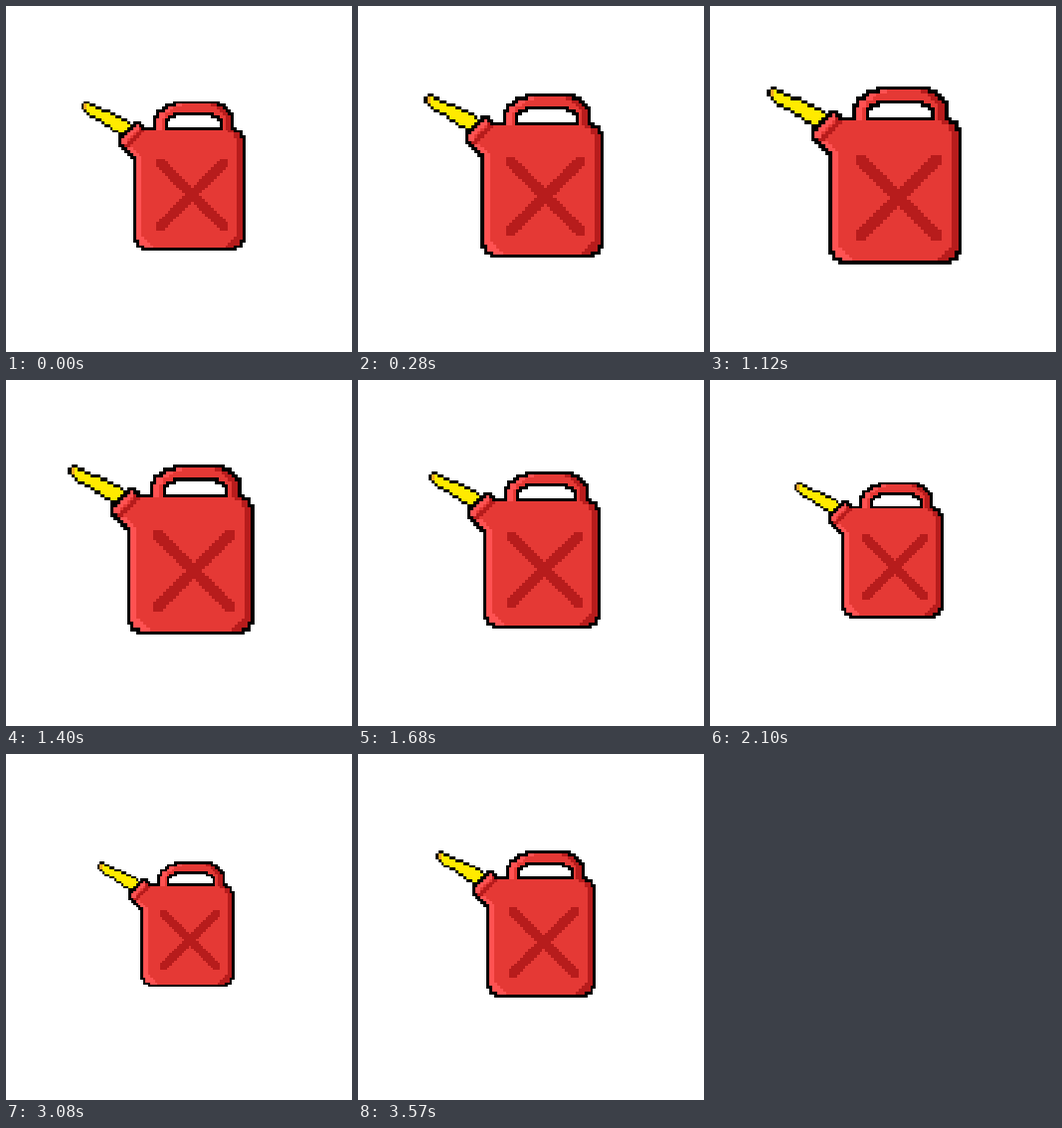
An HTML page for the animation above (3640 ms loop, 348x348 px).

```html
<!DOCTYPE html>
<html lang="en">
<head>
<meta charset="utf-8">
<title>Fuel can</title>
<style>
html, body { margin: 0; width: 100%; height: 100%; overflow: hidden; background: #fff; }
svg { display: block; width: 100%; height: 100%; }
</style>
</head>
<body>
<svg viewBox="0 0 348 348" shape-rendering="crispEdges"><g id="can"></g></svg>
<script>
const LOOP = 3640, STEP = 70, CELL = 2.9, MID = 174, NUDGE = 0.15;
const BLACK = '#000', RED = '#e53935', LIGHT = '#ff5252', DARK = '#b71c1c',
      YELLOW = '#ffea00', ORANGE = '#f9a825';
const art = document.getElementById('can');

// The can is pixel art: each test below says whether cell (x, y) is in a shape.
// Box from (l, t) up to (r, b); rl and rr are the corner widths, ry their height.
function inBox(x, y, l, t, r, b, rl, rr, ry) {
  if (y < t || y >= b) return false;
  const v = Math.max(0, ry - Math.min(y - t, b - 1 - y) - 0.5) / ry;
  const cut = 1 - Math.sqrt(1 - v * v);
  return x >= l + Math.round(rl * cut) && x < r - Math.round(rr * cut);
}

const body = (x, y) => inBox(x, y, -15, -17, 22, 24, 5, 5, 5);
const handle = (x, y) => y < -16 && inBox(x, y, -8, -26, 18, 0, 12, 8, 6.5);
const hole = (x, y) => y < -18 && inBox(x, y, -4, -22, 14, 0, 6, 6, 3.5);
const collar = (x, y) => x + y >= -34 && x + y < -20 && x - y >= -7 && x - y <= 4;
const hull = (x, y) => body(x, y) || collar(x, y) || handle(x, y);
const metal = (x, y) => hull(x, y) && !near(hole, x, y);

function spout(x, y) {
  const cx = x + 0.5, cy = y + 0.5;
  return x >= -33 && x + y <= -37 &&
    cy >= -24.8 + 0.46 * (cx + 29.5) && cy <= -16.2 + 0.63 * (cx + 20.5);
}

function cross(x, y) {
  const u = x + 8, v = y + 7, size = 24;
  return Math.min(u, v) >= 0 && Math.max(u, v) <= size &&
    (Math.abs(u - v) <= 2 || Math.abs(u + v - size) <= 2);
}

function near(shape, x, y) {
  for (let i = -1; i <= 1; i++)
    for (let j = -1; j <= 1; j++)
      if (shape(x + i, y + j)) return true;
  return false;
}

const beside = (shape, x, y) =>
  shape(x - 1, y) || shape(x + 1, y) || shape(x, y - 1) || shape(x, y + 1);

function shade(x, y) {
  const groove = collar(x, y) && (x + y === -31 || x + y === -30);
  if (groove || cross(x, y)) return DARK;
  if (!hull(x - 2, y) || y - x > 32) return LIGHT;
  if (!hull(x + 2, y) || x + y > 38) return DARK;
  return RED;
}

function color(x, y) {
  if (hole(x, y)) return null;
  if (metal(x, y)) return shade(x, y);
  if (spout(x, y)) return x === -33 ? ORANGE : YELLOW;
  if (near(hull, x, y) || beside(spout, x, y)) return BLACK;
  return null;
}

function build() {
  const paths = {};
  for (let y = -28; y < 27; y++) {
    for (let x = -36; x < 25; x++) {
      const c = color(x, y);
      if (c) paths[c] = (paths[c] || '') + `M${x} ${y}h1v1h-1z`;
    }
  }
  for (const c in paths) {
    const p = document.createElementNS('http://www.w3.org/2000/svg', 'path');
    p.setAttribute('fill', c);
    p.setAttribute('d', paths[c]);
    art.append(p);
  }
}

function draw(t) {
  const held = Math.floor((t % LOOP) / STEP) * STEP;
  const scale = CELL * (1 + 0.2 * Math.sin(2 * Math.PI * held / LOOP));
  art.setAttribute('transform', `translate(${MID + NUDGE} ${MID - NUDGE}) scale(${scale})`);
}

build();
const start = performance.now();
function tick() {
  draw(performance.now() - start);
  requestAnimationFrame(tick);
}
tick();
</script>
</body>
</html>
```
